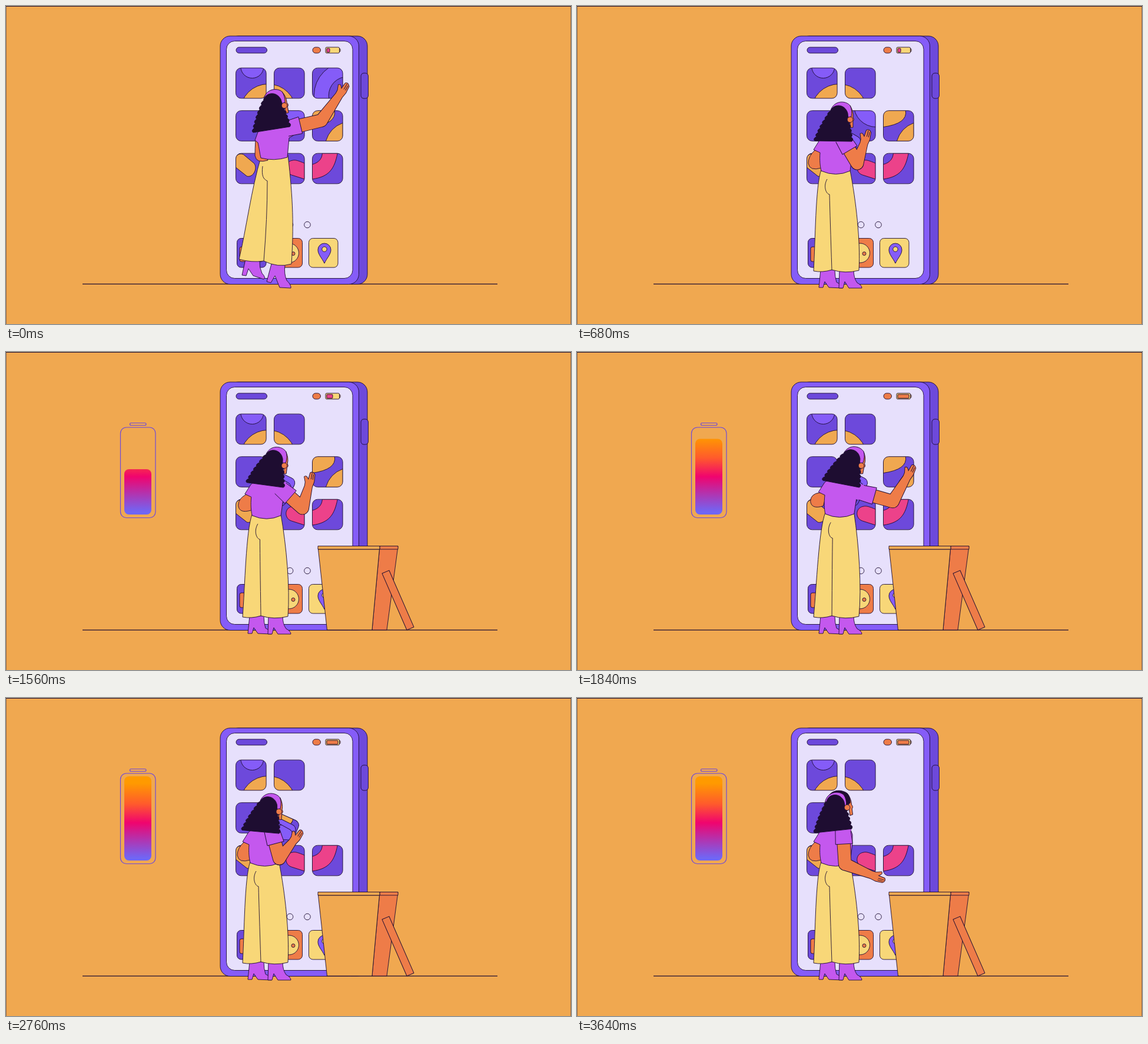
Recreate the animation shown at these times as an HTML page with a canvas. Size 960x540 px, loop 3.68 s.

```html
<!DOCTYPE html>
<html lang="en">
<head>
<meta charset="utf-8">
<title>Clearing the home screen</title>
<style>
html, body { margin: 0; width: 100%; height: 100%; overflow: hidden; background: #f0a850; }
canvas { display: block; }
</style>
</head>
<body>
<canvas id="stage" width="960" height="540"></canvas>
<script>
const ctx = document.getElementById('stage').getContext('2d');
const LOOP = 3680;
const INK = '#1e0d31', SAND = '#f0a850', VIOLET = '#6d49db', LILAC = '#855cf8', PALE = '#e7e0fc',
  YELLOW = '#f8d778', ORANGE = '#ee7c48', PINK = '#ec428a', MAGENTA = '#c458ee';

function ease(t, from, to) {
  const k = t >= to ? 1 : t <= from ? 0 : (t - from) / (to - from);
  return k * k * (3 - 2 * k);
}
const lerp = (a, b, k) => a + (b - a) * k;
const degrees = (x, y) => Math.atan2(y, x) * 180 / Math.PI;

// Moves are [from, to, ...values]: ease into each set of values, hold until the next.
const follow = (moves, t) => moves.reduce((now, [from, to, ...next]) =>
  next.map((v, i) => lerp(now[i] ?? v, v, ease(t, from, to))), []);

// Blend two path strings of the same structure.
function mix(a, b, k) {
  const target = b.match(/-?\d+/g);
  let i = 0;
  return a.replace(/-?\d+/g, v => lerp(+v, +target[i++], k));
}

const circle = (x, y, r) => `M${x - r} ${y}a${r} ${r} 0 1 1 ${2 * r} 0a${r} ${r} 0 1 1 ${-2 * r} 0`;

function paint(path, fill, stroke = INK, width = .9) {
  const p = typeof path === 'string' ? new Path2D(path) : path;
  if (fill) { ctx.fillStyle = fill; ctx.fill(p); }
  if (stroke) { ctx.strokeStyle = stroke; ctx.lineWidth = width; ctx.stroke(p); }
}

function box(x, y, w, h, r, fill, stroke, width) {
  const p = new Path2D();
  p.roundRect(x, y, w, h, r);
  paint(p, fill, stroke, width);
}

function placed(x, y, angle, draw) {
  ctx.save();
  ctx.translate(x, y);
  ctx.rotate(angle * Math.PI / 180);
  draw();
  ctx.restore();
}

// Tile artwork as [colour, path] around the tile centre.
const ART = {
  plain: [],
  sunrise: [[LILAC, circle(2, -28, 19.5)], [SAND, circle(29, 49, 47.5)]],
  hill: [[SAND, circle(-36, 49, 47.5)]],
  rings: [[LILAC, circle(34, 21, 57)], [VIOLET, circle(34, 21, 32)]],
  moon: [[LILAC, circle(27, -36, 38)]],
  leaves: [[SAND, 'M-26 -26H12Q16 -4 -26 2Z'], [SAND, 'M-3 26Q4 3 26 -5V26Z']],
  pill: [[SAND, 'M-26 -2V-20Q-21 -27 -13 -24L5 -9C12 -1 4 16 -7 13Z']],
  tongue: [[PINK, 'M26 -9C16 -13 11 -15 6 -14C-9 -12 -9 7 4 11L26 18Z']],
  bend: [[PINK, 'M17 -26C12 -1 4 14 -26 18V-7C-14 -10 -9 -18 -9 -26Z']]
};
const HOME = ['sunrise', 'hill', 'rings', 'plain', 'moon', 'leaves', 'pill', 'tongue', 'bend'];
const slot = art => {
  const i = HOME.indexOf(art);
  return [416.3 + 65 * (i % 3), 131 + 72.5 * Math.floor(i / 3)];
};

function tile(art, x, y, angle = 0) {
  placed(x, y, angle, () => {
    const frame = new Path2D();
    frame.roundRect(-25.8, -25.8, 51.6, 51.6, 9);
    ctx.save();
    ctx.clip(frame);
    paint(frame, VIOLET, null);
    for (const [color, path] of ART[art]) paint(path, color);
    ctx.restore();
    paint(frame);
  });
}

// Her beats: [from, to, wrist x, wrist y, lean, head tilt].
const BEATS = [
  [0, 0, 567, 150, 0, -10],
  [100, 640, 488, 232, 0, 0],
  [740, 1180, 474, 239, 0, 4],
  [1380, 1760, 561, 212, 1, 10],
  [1880, 2300, 486, 241, 0, 4],
  [2700, 3160, 529, 281, 0, 9],
  [3220, 3600, 502, 301, 0, -7]
];
const TAKEN = ['rings', 'moon', 'leaves'];
const PULLS = [1, 2, 4], TOSS = 5;

// Each tile is pulled to her chest, fanned out on the toss, then dropped in the bin.
function takenTile(i, t, lean) {
  const [from, to] = BEATS[PULLS[i]], [tossFrom, tossTo] = BEATS[TOSS];
  const [x, y, angle] = follow([
    [0, 0, ...slot(TAKEN[i]), 0],
    [from, to, 450 + 7 * i + 5 * lean, 236 - 6 * i, 30 - 4 * i],
    [tossFrom, tossTo, 550 - 18 * i, 270 - 17 * i, 8 + 26 * i],
    [tossTo, tossTo + 230, 583, 404, 30]
  ], t);
  if (y < 403) tile(TAKEN[i], x, y, angle);
}

function phone(charge) {
  box(378, 51, 236, 421.5, 17, VIOLET);
  box(603, 114, 12.5, 43, 5, VIOLET);
  box(364, 51, 235.5, 421.5, 17, LILAC);
  box(374.5, 59.5, 214.5, 403, 14, PALE);
  box(391, 70, 52.5, 10, 5, VIOLET);
  box(521, 70, 13.5, 10, 5, ORANGE);
  box(565, 72.5, 3, 5, 1, YELLOW);
  box(543, 70, 23.5, 10, 2, YELLOW);
  box(545, 72, 5 + 14 * charge, 6.5, 1, charge > .4 ? ORANGE : PINK);
  for (const art of HOME) if (!TAKEN.includes(art)) tile(art, ...slot(art));
  for (const x of [482.5, 512]) paint(circle(x, 371.5, 5.3), PALE);

  [VIOLET, ORANGE, YELLOW].forEach((color, i) => box(392.5 + 61.5 * i - i * (i - 1) / 2, 394.5, 49.5, 49.5, 7, color));
  box(397, 409, 40, 25, 3, ORANGE);
  paint(circle(481, 419.5, 16.5), YELLOW);
  for (const x of [476.5, 488]) paint(circle(x, 420.5, 3), ORANGE);
  paint('M541 437C537 428 530 422 530 414A11 11 0 0 1 552 414C552 422 545 428 541 437Z', LILAC);
  paint(circle(541, 413, 4.2), YELLOW);
}

function battery(t) {
  const [offset] = follow([[0, 0, -270], [860, 1180, 30], [1180, 1480, 0]], t);
  const height = 143 * ease(t, 1030, 2040);
  ctx.save();
  ctx.translate(offset, 0);
  box(194.5, 128, 59.5, 153.5, 10, null, VIOLET, 1.2);
  box(210.5, 120.5, 27.5, 4, 2, null, VIOLET, 1.2);
  const glow = ctx.createLinearGradient(0, 133, 0, 276);
  [['#ff9a00', .08], ['#ff5a2c', .33], ['#f0046e', .55], ['#7066f5', .97]]
    .forEach(([color, at]) => glow.addColorStop(at, color));
  if (height > 1) box(201, 276 - height, 46, height, Math.min(8, height / 2), glow, null);
  ctx.restore();
}

// The bin grows from the floor, hops, throws its lid off and turns to show its side.
function bin(t) {
  const scale = ease(t, 1000, 1160), side = ease(t, 1280, 1460);
  if (!scale) return;
  const hop = Math.min(1, Math.max(0, (t - 1160) / 260));
  ctx.save();
  ctx.translate(582, 472);
  ctx.scale(scale, scale);
  ctx.translate(-582, -472);
  ctx.save();
  ctx.translate(0, -24.5 * Math.sin(Math.PI * hop));
  if (side > 0) {
    const top = 635 + 31 * side, foot = 622 + 25 * side;
    paint(`M635 330H${top}L${foot} 472H622Z`, ORANGE);
    paint(`M635 329.5H${top}V335H635Z`, ORANGE);
  }
  paint('M530.5 335H634.5L622 472H545.5Z', SAND);
  paint('M530 329.5H635V335H530Z', SAND);
  ctx.restore();
  const [x, y, turn] = follow([[0, 0, 582, 323, 0], [1160, 1280, 595.5, 288, -7.5], [1280, 1540, 666, 421.5, 66.4]], t);
  placed(x, y, turn, () => box(-52.5, -6.5, 105, 13, 0, ORANGE));
  ctx.restore();
}

// Clothing as [standing, on tiptoe] outlines.
const CLOTHES = {
  bootL: ['M414 448L411 478L418 478L421 468L428 478L451 479Q450 473 441 469Q438 460 438 448Z',
    'M407 430L401 457L408 458L412 446L420 458L438 464Q442 461 435 454Q430 444 431 432Z'],
  bootR: ['M446 448L445 479L452 479L455 468L462 479L484 479Q484 474 476 470Q470 462 470 448Z',
    'M451 438L443 468L450 470L457 458L465 478L484 479Q485 474 477 466Q472 455 474 440Z'],
  pants: ['M415 278C405 305 405 400 402 450Q417 453 433 448Q456 455 479 449C482 400 474 330 464 279Z',
    'M433 257C417 310 408 380 396 430Q417 436 438 433Q462 445 485 438C489 375 488 330 479 253Z'],
  crease: ['M425 294C418 306 423 319 429 320Q430 360 433 448', 'M436 272C434 288 437 294 444 297Q444 360 438 433'],
  shirt: ['M412 228L402 244L413 249C412 262 413 272 415 280Q440 291 464 280L468 247L468 232L462 215Q430 210 412 228Z',
    'M428 214L423 228L428 232C430 240 431 250 433 258Q455 264 478 257L481 224L488 220L488 196Q470 188 428 214Z']
};

const HAND = new Path2D('M-4 -6L4 -7L12 -11Q15 -9 12 -6L9 -3L21 -3Q25 0 20 5L8 7L-4 6Z');

const HAIR = (() => {
  let d = 'M3 37L-60 36';
  for (let i = 1; i <= 7; i++) {
    const k = i / 7, x = lerp(-60, -33, k) - 2 * Math.sin(Math.PI * k), y = lerp(36, -15, k);
    d += `Q${x - 7} ${y + 4} ${x} ${y}`;
  }
  d += 'C-29 -27 -9 -28 -4 -11L-3 0';
  for (let i = 1; i <= 5; i++) d += `Q${i * 1.2 + 1} ${7.4 * i - 4} ${i * 1.2 - 3} ${7.4 * i}`;
  return d + 'Z';
})();

// Limb piece tapering from radius ra to rb.
function taper(path, ax, ay, ra, bx, by, rb) {
  const length = Math.hypot(bx - ax, by - ay) || 1;
  const nx = (by - ay) / length, ny = (ax - bx) / length;
  path.moveTo(ax + nx * ra, ay + ny * ra);
  path.lineTo(bx + nx * rb, by + ny * rb);
  path.lineTo(bx - nx * rb, by - ny * rb);
  path.lineTo(ax - nx * ra, ay - ny * ra);
  path.closePath();
  path.moveTo(bx + rb, by);
  path.arc(bx, by, rb, 0, 7);
}

// The elbow follows from shoulder and wrist; both bones lengthen a little with reach.
function elbow(sx, sy, wx, wy) {
  const d = Math.hypot(wx - sx, wy - sy), upper = 42 + .155 * d, fore = 28 + .25 * d;
  const along = (d * d + upper * upper - fore * fore) / (2 * d);
  const out = Math.sqrt(Math.max(0, upper * upper - along * along));
  const ux = (wx - sx) / d, uy = (wy - sy) / d;
  return [sx + ux * along - uy * out, sy + uy * along + ux * out];
}

function reachingArm(sx, sy, wx, wy) {
  const [ex, ey] = elbow(sx, sy, wx, wy);
  const arm = new Path2D(), angle = degrees(wx - ex, wy - ey);
  taper(arm, sx, sy, 11, ex, ey, 10.5);
  taper(arm, ex, ey, 10.5, wx, wy, 6);
  arm.addPath(HAND, new DOMMatrix().translate(wx, wy).rotate(angle));
  paint(arm, null, INK, 1.8);
  paint(arm, ORANGE, null);
  placed(wx, wy, angle, () => paint('M11 1L22 0M11 4L20 3', null));
  placed(sx, sy, degrees(ex - sx, ey - sy), () => {
    paint('M-12 -13L22 -15V14L-12 13Z', MAGENTA, null);
    paint('M0 -13L22 -15V14L-2 13', null);
  });
}

function head(x, y, tilt, turn) {
  placed(x, y, tilt, () => {
    ctx.save();
    ctx.translate(3 * turn, 0);
    paint('M0 -24Q6 -14 5 -4Q8 0 5 3L5 13L0 14Z', ORANGE);
    if (turn > .5) paint('M-35 -18C-28 -34 -10 -33 0 -24Q5 -17 3 -7L-4 -4Z', INK);
    ctx.translate(-6 * turn, 2 * turn);
    paint('M-33 -16C-27 -33 -8 -33 0 -24Q4 -16 2 -5L-4 -4Z', MAGENTA);
    ctx.restore();
    paint(HAIR, INK);
    paint(circle(0, 0, 4.8), ORANGE, INK, .8);
  });
}

function woman(t, wx, wy, lean, tilt) {
  const tiptoe = 1 - ease(t, ...BEATS[1]), turn = ease(t, ...BEATS[TOSS]);
  const wear = (name, color) => paint(mix(...CLOTHES[name], tiptoe), color);
  wear('bootL', MAGENTA);
  wear('bootR', MAGENTA);

  // Leaning sways everything above the hem.
  ctx.save();
  ctx.translate(0, 450);
  ctx.transform(1, 0, -.04 * lean, 1 + .03 * lean, 0, 0);
  ctx.translate(0, -450);
  wear('pants', YELLOW);
  wear('crease');
  const cuffX = 404 + 20 * tiptoe, cuffY = 245 - 17 * tiptoe;
  const backX = 393 + 30 * tiptoe - 4 * lean, backY = 267 - 13 * tiptoe - 8 * lean;
  paint(`M${cuffX} ${cuffY}Q${backX} ${backY - 12} ${backX} ${backY}Q${backX + 2} ${backY + 14} ${backX + 22} ${backY + 8}L${cuffX + 12} ${cuffY + 2}Z`, ORANGE);
  wear('shirt', MAGENTA);
  ctx.restore();

  reachingArm(452 + 27 * tiptoe + 32 * lean, 226 - 18 * tiptoe + 13 * lean, wx, wy);
  head(464 + 9 * tiptoe + 19 * lean - 5 * turn, 193 - 14 * tiptoe + Math.min(0, tilt), tilt, turn);
}

function frame() {
  const t = performance.now() % LOOP;
  ctx.lineJoin = 'round';
  ctx.fillStyle = SAND;
  ctx.fillRect(0, 0, 960, 540);
  ctx.fillStyle = INK;
  ctx.fillRect(0, 0, 960, 1);
  paint('M.5 0V540M959.5 0V540', null, 'rgba(30, 13, 49, .4)', 1);
  paint('M130 472.2H835', null, INK, 1.3);
  battery(t);
  phone(ease(t, 1400, 1800));
  const [wx, wy, lean, tilt] = follow(BEATS, t);
  for (const i of [2, 1, 0]) takenTile(i, t, lean);
  woman(t, wx, wy, lean, tilt);
  bin(t);
  requestAnimationFrame(frame);
}
frame();
</script>
</body>
</html>
```
